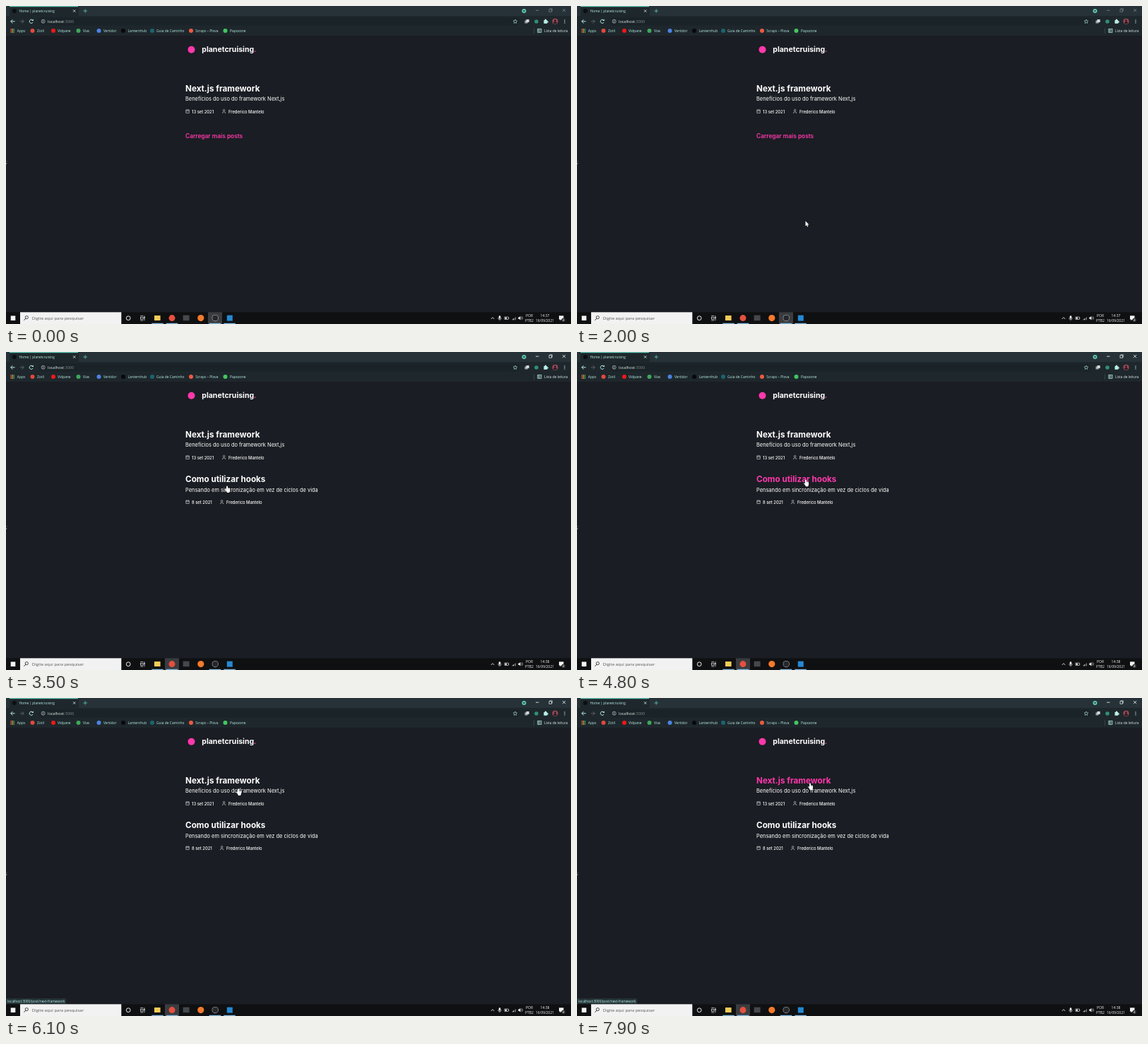
Recreate the animation shown at these times as an HTML page with a canvas. Size 800x450 px, loop 8000 ms.

```html
<!DOCTYPE html>
<html lang="pt-BR">
<head>
<meta charset="utf-8">
<title>Home</title>
<style>
html, body { margin: 0; width: 100%; height: 100%; overflow: hidden; background: #1a1d23; }
canvas { display: block; width: 100vw; height: 100vh; }
</style>
</head>
<body>
<canvas id="stage" width="800" height="450"></canvas>
<script>
const ctx = document.getElementById('stage').getContext('2d');
const LOOP = 8000, STEP = 100;
const FOCUS = 2900, LOADED = 3200, STATUS = 5600, SHOWN = 600;
const PINK = '#ff38ac', MINT = '#b9eee5', TEAL = '#5fc9b4';
const PAGE = '"Inter", sans-serif', UI = '"Open Sans", sans-serif';
const SITE = 'planetcruising', AUTHOR = 'Frederico Mantelo';

// Pointer path: time, x, y of the tip
const PATH = [
  [600, 225, 381], [1000, 285, 335], [1400, 323.5, 304.3], [2000, 323.5, 304.3],
  [2300, 350, 262], [2600, 325, 200], [2800, 313, 189.5], [4700, 313, 189.5],
  [4900, 335, 172], [5100, 375, 142], [5400, 329.3, 114.8], [5600, 329.3, 114.8],
  [6100, 329, 128.3], [6500, 329, 128.3], [6900, 362, 129], [7300, 326, 127],
  [7400, 326, 127], [7600, 333, 136], [7900, 330, 120.6]
];

function rect(x, y, w, h, color) {
  ctx.fillStyle = color;
  ctx.fillRect(x, y, w, h);
}

function box(x, y, w, h, color, width = 0.7) {
  ctx.strokeStyle = color;
  ctx.lineWidth = width;
  ctx.strokeRect(x, y, w, h);
}

function round(x, y, w, h, r, color) {
  ctx.fillStyle = color;
  ctx.beginPath();
  ctx.roundRect(x, y, w, h, r);
  ctx.fill();
}

function dot(x, y, r, color) {
  ctx.fillStyle = color;
  ctx.beginPath();
  ctx.arc(x, y, r, 0, 7);
  ctx.fill();
}

function arc(x, y, r, color, width = 0.8, from = 0, to = Math.PI * 2) {
  ctx.strokeStyle = color;
  ctx.lineWidth = width;
  ctx.beginPath();
  ctx.arc(x, y, r, from, to);
  ctx.stroke();
}

// Flat list of coordinates: x0, y0, x1, y1, ...
function trace(pts) {
  ctx.beginPath();
  for (let i = 0; i < pts.length; i += 2) ctx.lineTo(pts[i], pts[i + 1]);
}

function line(pts, color, width = 0.8) {
  trace(pts);
  ctx.strokeStyle = color;
  ctx.lineWidth = width;
  ctx.stroke();
}

function shape(pts, color) {
  trace(pts);
  ctx.closePath();
  ctx.fillStyle = color;
  ctx.fill();
}

function text(str, x, y, size, color, family = UI, weight = 400, align = 'left') {
  ctx.font = `${weight} ${size}px ${family}`;
  ctx.textAlign = align;
  ctx.fillStyle = color;
  ctx.fillText(str, x, y);
}

function tabStrip(focused) {
  rect(0, 0, 800, 14, '#263238');
  round(5, 0.5, 98, 16, 2, '#1e272c');
  rect(5, 0, 97, 1.2, TEAL);
  dot(11.8, 7, 3, '#0b0f12');
  text('Home | ' + SITE, 18.5, 8.9, 4.8, MINT);
  line([95, 5.3, 98.4, 8.7], '#dceeea');
  line([98.4, 5.3, 95, 8.7], '#dceeea');
  line([109.5, 7, 115, 7], TEAL);
  line([112.2, 4.3, 112.2, 9.7], TEAL);

  dot(733.5, 7, 3, TEAL);
  shape([732, 6.2, 735, 6.2, 733.5, 8.4], '#1e272c');
  const c = focused ? '#f2f4f4' : '#7c868a';
  line([750, 6.2, 754.5, 6.2], c);
  box(769, 4.8, 3.4, 3.4, c);
  line([770, 4.8, 770, 3.8, 773.4, 3.8, 773.4, 7.2, 772.4, 7.2], c, 0.6);
  line([788, 4, 792.2, 8.2], c);
  line([792.2, 4, 788, 8.2], c);
}

function toolbar() {
  rect(0, 14, 800, 28, '#1e272c');
  line([12.5, 21.8, 6.8, 21.8], MINT, 1);
  line([9.4, 19.1, 6.7, 21.8, 9.4, 24.5], MINT, 1);
  line([19.8, 21.8, 25.2, 21.8], '#667176');
  line([22.6, 19.1, 25.3, 21.8, 22.6, 24.5], '#667176');
  arc(35.8, 21.8, 2.6, MINT, 1, 0.5, 5.5);
  shape([36.2, 20.9, 38.8, 20.9, 38.8, 18.4], MINT);

  round(46, 16, 682, 11.5, 5.7, '#1a2327');
  arc(52.6, 21.7, 2.5, '#c9d3d3', 0.7);
  rect(52.2, 21.3, 0.8, 1.8, '#c9d3d3');
  rect(52.2, 20.1, 0.8, 0.7, '#c9d3d3');
  text('localhost', 59, 23.7, 5.5, '#e2f1ee');
  text(':3000', 59 + ctx.measureText('localhost').width, 23.7, 5.5, '#83908f');

  const star = [];
  for (let i = 0; i < 11; i++) {
    const a = i * Math.PI / 5 - Math.PI / 2, r = i % 2 ? 1.4 : 3;
    star.push(721 + r * Math.cos(a), 22 + r * Math.sin(a));
  }
  line(star, MINT, 0.6);
  rect(734.5, 20.5, 4.2, 4, '#9aa4a6');
  rect(736.5, 19, 4.2, 4, '#d2d8d8');
  dot(751, 22, 2.8, '#2f8f78');
  rect(761.5, 20, 4.8, 4.8, MINT);
  dot(764, 19.7, 1.2, MINT);
  dot(766.6, 22.4, 1.2, MINT);

  dot(777.5, 21.7, 4, '#a04a58');
  dot(777.5, 20.6, 1.5, '#271d24');
  round(775, 22.3, 5, 2.8, 1.4, '#271d24');
  for (let i = -1; i < 2; i++) dot(791, 22 + i * 2.1, 0.65, MINT);
}

function bookmarks() {
  const hues = ['#e4574b', '#e0b33c', '#4aa564'];
  for (let i = 0; i < 9; i++)
    rect(6.4 + (i % 3) * 2.1, 32.2 + Math.floor(i / 3) * 2.1, 1.5, 1.5, hues[i % 3]);
  text('Apps', 15.8, 36.8, 4.9, MINT);
  const marks = [
    [37.5, '#e2483d', 'Zotil', 44], [67, '#f01818', 'Vidpane', 73],
    [102.5, '#3fa65a', 'Vias', 109], [131.5, '#4c83e4', 'Vertidor', 138],
    [166, '#08090b', 'Lanternhub', 172.5], [207, '#1c6470', 'Guia de Caminho', 213],
    [262, '#ec5a43', 'Scraps – Plova', 268.3], [310.5, '#42c660', 'Papozone', 317]
  ];
  for (const [x, color, name, tx] of marks) {
    dot(x, 35, 3, color);
    text(name, tx, 36.8, 4.9, MINT);
  }
  line([747.5, 31, 747.5, 39], '#46565b', 0.6);
  box(752.8, 32.3, 5.2, 5.2, MINT, 0.7);
  line([754.6, 32.3, 754.6, 37.5], MINT, 0.6);
  line([753, 34, 758, 34], MINT, 0.5);
  line([753, 35.8, 758, 35.8], MINT, 0.5);
  text('Lista de leitura', 762, 36.8, 4.9, '#dceeea');
}

function post(y, title, about, date, userX, hot) {
  text(title, 254, y + 4.2, 11.7, hot ? PINK : '#fff', PAGE, 700);
  text(about, 254, y + 17.3, 7.44, '#fff', PAGE);
  const c = '#e4e4e6';
  box(254.9, y + 30, 4.3, 4.3, c, 0.6);
  line([254.9, y + 31.6, 259.2, y + 31.6], c, 0.5);
  line([256, y + 29.2, 256, y + 30.5], c, 0.5);
  line([258.1, y + 29.2, 258.1, y + 30.5], c, 0.5);
  text(date, 263, y + 34.7, 5.83, '#fff', PAGE, 500);
  arc(userX + 2.6, y + 30.6, 1.25, c, 0.6);
  arc(userX + 2.6, y + 35, 2.2, c, 0.6, Math.PI, Math.PI * 2);
  text(AUTHOR, userX + 9, y + 34.7, 5.83, '#fff', PAGE, 500);
}

function page(t, p) {
  const loaded = t >= LOADED;
  dot(262.5, 61.8, 5, PINK);
  text(SITE, 277.3, 65.4, 10.5, '#fff', PAGE, 700);
  text('.', 350.7, 65.4, 10.5, PINK, PAGE, 700);
  const over = y => t >= 4800 && p.x < 359 && p.y > y - 8 && p.y < y + 8;
  post(117, 'Next.js framework', 'Benefícios do uso do framework Next,js', '13 set 2021', 306, over(117));
  if (loaded) {
    post(180.2, 'Como utilizar hooks', 'Pensando em sincronização em vez de ciclos de vida',
      '8 set 2021', 303, over(180.2));
  } else {
    text('Carregar mais posts', 254, 187.2, 8.33, PINK, PAGE, 600);
  }
  text(';', 0, loaded ? 250 : 223.2, 6.6, '#f0f0f0', PAGE);
  if (t >= STATUS) {
    rect(0, 425.2, 85, 8, '#26363a');
    text('localhost:3000/post/next-framework', 2, 431, 4.8, MINT);
  }
}

function tray(t) {
  const c = '#f2f2f2';
  line([686.8, 443, 689, 440.6, 691.2, 443], c);
  round(697.7, 438.2, 2.6, 4.4, 1.3, c);
  arc(699, 441.4, 2.3, c, 0.6, 0, Math.PI);
  line([699, 443.6, 699, 445.2], c, 0.6);
  box(706, 440, 5.2, 3.4, c, 0.6);
  rect(711.4, 441, 0.8, 1.4, c);
  rect(706.6, 440.6, 2.4, 2.2, c);
  for (let i = 0; i < 4; i++) rect(716.8 + i * 1.4, 443.3 - i, 0.9, 1 + i, i < 2 ? c : '#888');
  shape([725.2, 440.4, 726.6, 440.4, 728.4, 438.8, 728.4, 444.4, 726.6, 442.8, 725.2, 442.8], c);
  arc(728.3, 441.6, 1.7, c, 0.5, -0.9, 0.9);
  arc(728.3, 441.6, 3.2, c, 0.5, -0.9, 0.9);
  text('POR', 741, 439.6, 5, c, UI, 400, 'center');
  text('PTB2', 741, 446.8, 5, c, UI, 400, 'center');
  text(t >= FOCUS ? '14:38' : '14:37', 763, 439.6, 5, c, UI, 400, 'center');
  text('16/09/2021', 763, 446.8, 4.9, c, UI, 400, 'center');
  rect(783, 438.3, 6.5, 5.2, c);
  shape([784.5, 443, 787, 443, 784.5, 445.3], c);
  dot(789.3, 444.2, 2.6, '#3b3b3b');
  text('4', 789.3, 445.8, 4.2, '#fff', UI, 400, 'center');
}

function taskbar(t) {
  rect(0, 433.3, 800, 16.7, '#0f1012');
  rect(6.7, 438.4, 6.6, 6.6, '#f4f4f4');
  rect(20, 433.3, 143.3, 16.7, '#f2f2f2');
  arc(29.3, 440.6, 2.1, '#222', 0.8);
  line([27.8, 442.2, 25.4, 444.8], '#222', 0.9);
  text('Digite aqui para pesquisar', 36.8, 443.9, 6.03, '#555');

  const c = '#eee';
  arc(173.2, 441.7, 2.9, c, 1);
  box(190.5, 440.3, 3.6, 2.8, c, 0.7);
  line([190.3, 438.4, 194.3, 438.4], c, 0.7);
  line([190.3, 445, 194.3, 445], c, 0.7);
  line([196, 438.2, 196, 445.2], c, 0.7);
  rect(195.3, 440.2, 1.5, 1.5, c);

  rect(t >= FOCUS ? 225 : 286, 433.3, 20, 16.7, '#3a3c3f');
  for (const x of [206.3, 226.8, 287.7, 308.3]) rect(x, 448.8, 16.5, 1.2, '#84bce6');
  rect(210, 438, 8.6, 7, '#f6cb55');
  dot(235, 441.6, 4.5, '#e5503e');
  rect(250.6, 437.6, 9, 7.6, '#44484c');
  dot(275.8, 441.6, 4.6, '#f37a2c');
  dot(296.2, 441.6, 4.6, '#b9bbc0');
  dot(296.2, 441.6, 4, '#26272b');
  rect(312.8, 437.6, 8, 8, '#2489d2');
  tray(t);
}

function pointerAt(t) {
  let i = PATH.findIndex(k => k[0] >= t);
  if (i < 0) i = PATH.length - 1;
  if (i === 0) return { x: PATH[0][1], y: PATH[0][2] };
  const [t0, x0, y0] = PATH[i - 1], [t1, x1, y1] = PATH[i];
  const k = Math.min(1, (t - t0) / (t1 - t0));
  return { x: x0 + (x1 - x0) * k, y: y0 + (y1 - y0) * k };
}

function onLink(t, { x, y }) {
  if (t < LOADED) return x < 336 && y > 177 && y < 193;
  return x > 254 && x < 546 && ((y > 108 && y < 155) || (y > 172 && y < 218));
}

function pointer(t, p) {
  if (t < SHOWN) return;
  ctx.save();
  ctx.translate(p.x, p.y);
  if (onLink(t, p)) {
    round(-0.9, 0, 1.9, 7, 0.9, '#fff');
    round(-1, 3.1, 5, 5, 1.2, '#fff');
    shape([-1, 7.5, -2.9, 5.3, -2.5, 4.5, -0.9, 5.3, 3.8, 6, 3.1, 9.6, 0, 9.6], '#fff');
    line([1.1, 3.6, 1.1, 5.4], '#555', 0.3);
    line([2.5, 3.8, 2.5, 5.4], '#555', 0.3);
  } else {
    const arrow = [0, 0, 0, 7.2, 1.6, 5.8, 2.7, 8.3, 3.9, 7.8, 2.8, 5.3, 5, 5.2];
    line([...arrow, 0, 0], '#111', 0.8);
    shape(arrow, '#fff');
  }
  ctx.restore();
}

function draw(now) {
  const t = Math.floor((now % LOOP) / STEP) * STEP;
  const p = pointerAt(t);
  rect(0, 0, 800, 450, '#1a1d23');
  tabStrip(t >= FOCUS);
  toolbar();
  bookmarks();
  page(t, p);
  taskbar(t);
  pointer(t, p);
}

const start = performance.now();
function tick() {
  draw(performance.now() - start);
  requestAnimationFrame(tick);
}
tick();
</script>
</body>
</html>
```
